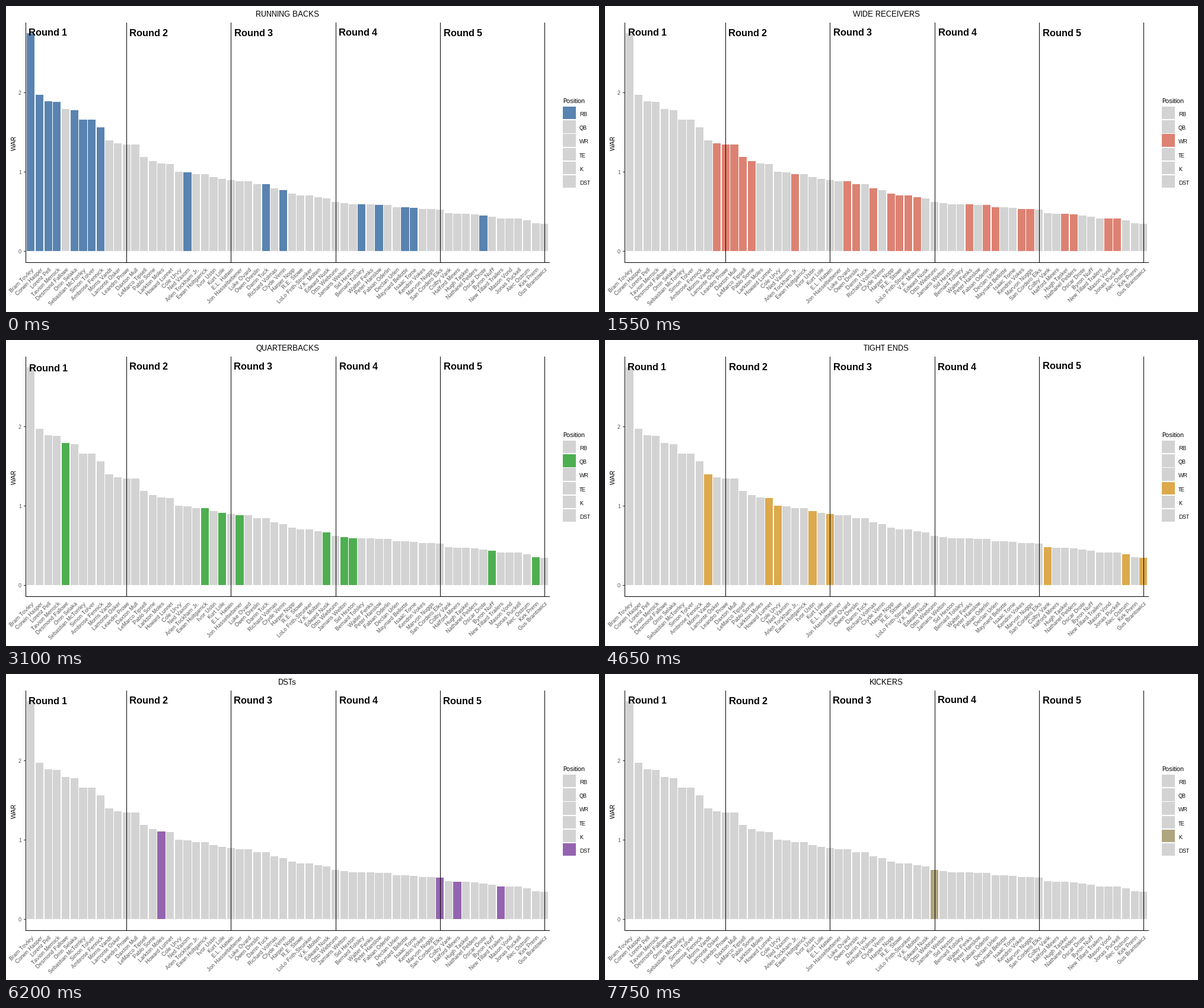
Animation, 1000 px wide and 517 px high, one loop 9300 ms. Source, as a matplotlib script:

```python
import matplotlib.pyplot as plt
from matplotlib.animation import FuncAnimation
from matplotlib.patches import Rectangle

plt.rcParams.update({
    "font.family": "Liberation Sans",
    "text.hinting": "default",
    "text.hinting_factor": 1,
})

W, H, DPI = 1000, 517, 64
GREY, INK, SOFT = "#d3d3d3", "black", "#4d4d4d"
BASE = 414                      # pixel row of value zero
FIRST, PITCH = 35.23, 14.6774   # left edge of the first bar, bar distance
BAR = 0.9 * PITCH

COLORS = {"RB": "#5983b0", "QB": "#4daf50", "WR": "#dd8273",
          "TE": "#dca94c", "K": "#afa57f", "DST": "#9464b0"}

# (name, position, top of the bar in pixels)
PLAYERS = [
    ("Bram Tovley", "RB", 46), ("Corwin Hasper", "RB", 150),
    ("Lorenz Pell", "RB", 161), ("Tavion Merrock", "RB", 162),
    ("Desmond Fallowe", "QB", 174), ("Orrin Selaka", "RB", 176),
    ("Sebastian McTorrley", "RB", 192), ("Simon Tolver", "RB", 192),
    ("Ambrose Fennick", "RB", 205), ("Morris Vandt", "TE", 227),
    ("Lamonte Osker", "WR", 232), ("Leandro Prowe", "WR", 234),
    ("Daxton Mull", "WR", 234), ("LeMarco Tipsell", "WR", 255),
    ("Pablo Sorne", "WR", 262), ("Larkton Moles", "DST", 266),
    ("Howard Lunnet", "TE", 267), ("Cole Urvy", "TE", 280),
    ("Ned Vaxom", "RB", 281), ("Arlen Tockham Jr.", "WR", 284),
    ("Ewan Holtgarrick", "QB", 284), ("Ivor Ustin", "TE", 289),
    ("Kurt Lole", "QB", 292), ("E.L. Hatwin", "TE", 294),
    ("Jon Hasseltiebener", "QB", 296), ("Luke Ovard", "WR", 296),
    ("Owen Dreslin", "WR", 301), ("Darrin Tuck", "RB", 301),
    ("Richard Volmas", "WR", 308), ("Clyde Verrin", "RB", 311),
    ("Harper Nopp", "WR", 317), ("R.E. Stowe", "WR", 320),
    ("LoLo Frith-Strunker", "WR", 320), ("V.K. Molten", "WR", 323),
    ("Edward Nusk", "QB", 325), ("Otto Wiebrunn", "K", 331),
    ("Jamaris Welton", "QB", 333), ("Sid Hexton", "QB", 335),
    ("Bernard Tolsley", "RB", 335), ("Walter Fenks", "WR", 335),
    ("Peter Hanslow", "RB", 336), ("Fabian Oderlin", "WR", 336),
    ("Declan Urlen", "WR", 340), ("Maynard Bellotte", "RB", 340),
    ("Isaac Torne", "RB", 341), ("Kendrin Vokes", "WR", 343),
    ("Marvon Nuggs", "WR", 343), ("San Cordero Elks", "DST", 344),
    ("Colby Vank", "TE", 350), ("Halford Miners", "DST", 351),
    ("Hugh Tasker", "WR", 351), ("Nathanel Pelders", "WR", 352),
    ("Oscar Drote", "RB", 354), ("Byron Nuff", "QB", 356),
    ("New Tillard Trailers", "DST", 359), ("Mason Vond", "WR", 359),
    ("Jonas Puckell", "WR", 359), ("Alec Ostrum", "TE", 362),
    ("Kirk Prenn", "QB", 367), ("Gus Brantowicz", "TE", 368),
]

# title, highlighted position, then x and baseline of the round labels
SCENES = [
    ("RUNNING BACKS", "RB", (38, 208, 385, 561, 738), (50, 51, 51, 50, 51)),
    ("WIDE RECEIVERS", "WR", (39, 208, 385, 562, 738), (50, 51, 50, 50, 51)),
    ("QUARTERBACKS", "QB", (39, 208, 384, 562, 738), (53, 50, 50, 50, 50)),
    ("TIGHT ENDS", "TE", (38, 209, 385, 561, 738), (51, 51, 51, 51, 49)),
    ("DSTs", "DST", (38, 208, 384, 562, 737), (51, 50, 50, 50, 51)),
    ("KICKERS", "K", (39, 209, 384, 561, 738), (50, 51, 50, 49, 50)),
]

fig = plt.figure(figsize=(W / DPI, H / DPI), dpi=DPI, facecolor="white")
ax = fig.add_axes([0, 0, 1, 1])
ax.set_xlim(0, W)
ax.set_ylim(H, 0)
ax.axis("off")


def box(left, top, right, bottom, color, z=1):
    """Filled rectangle with its edges rounded to whole pixels."""
    x0, y0, x1, y1 = map(round, (left, top, right, bottom))
    return ax.add_patch(Rectangle((x0, y0), x1 - x0, y1 - y0, facecolor=color,
                                  linewidth=0, antialiased=False, zorder=z))


def label(x, y, text, px, color=INK, **kw):
    kw.setdefault("va", "baseline")
    return ax.text(x, y, text, fontsize=px * 72 / DPI, color=color,
                   zorder=4, **kw)


# bars and slanted names
marks = []
for i, (name, pos, top) in enumerate(PLAYERS):
    left = FIRST + PITCH * i
    marks.append((pos, box(left, top, left + BAR, BASE, GREY)))
    label(left + 12.5, 446, name, 8.8, SOFT, ha="right", rotation=45,
          rotation_mode="anchor")

# axes and round dividers
for x in (33, 203, 379, 556, 732, 908):
    box(x, 28, x + 1, 433, INK, 2)
box(33, 433, 917, 434, INK, 2)
for value, y in enumerate((414, 280, 146)):
    box(30, y, 33, y + 1, "#333333", 2)
    label(26, y + 4, str(value), 8.8, SOFT, ha="right")
label(13.5, 231, "WAR", 11, ha="center", va="center", rotation=90)

# legend
label(939, 164, "Position", 11)
for i, pos in enumerate(COLORS):
    top = 169.92 + 23.23 * i
    marks.append((pos, box(939, top, 961, top + 21.4, GREY)))
    label(967, round(top) + 16, pos, 8.8)

title = label(474.5, 18, "", 13, ha="center")
rounds = [label(0, 0, f"Round {n}", 16, weight="bold") for n in range(1, 6)]


def draw(frame):
    text, active, xs, ys = SCENES[frame]
    title.set_text(text)
    for pos, patch in marks:
        patch.set_facecolor(COLORS[pos] if pos == active else GREY)
    for item, x, y in zip(rounds, xs, ys):
        item.set_position((x, y))
    return [title, *rounds]


anim = FuncAnimation(fig, draw, frames=len(SCENES), interval=1550,
                     repeat=True, repeat_delay=0, blit=False)
plt.show()
```
